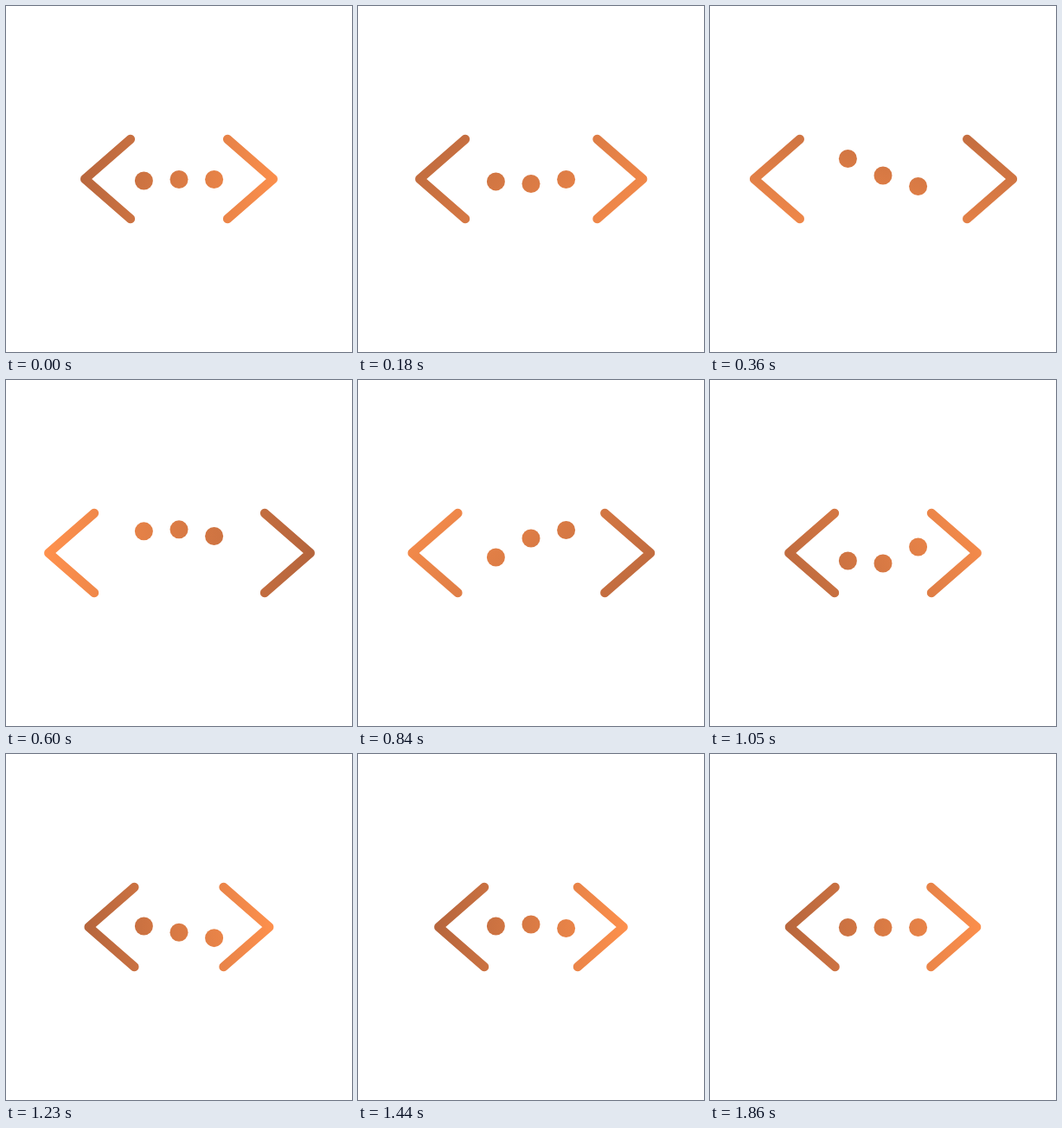
An HTML page with a canvas for the animation above (3.89 s loop, 400 by 400 pixels).

```html
<!DOCTYPE html>
<html lang="en">
<head>
<meta charset="utf-8">
<title>Code loader</title>
<style>
html, body { margin: 0; width: 100%; height: 100%; overflow: hidden; background: #fff; }
canvas { display: block; width: 400px; height: 400px; }
</style>
</head>
<body>
<canvas id="stage" width="400" height="400"></canvas>
<script>
const ctx = document.getElementById('stage').getContext('2d');
const LOOP = 3890, STEP = 30, ACTIVE = 1860;
const MID = 200, REST_Y = 200.5, DOT_DELAY = 133;
const DARK = '#b4643c', LIGHT = '#ff914d';

// Monotone cubic curve through [time, value] keys, held at both ends.
function curve(keys) {
  const n = keys.length;
  const slope = i => (keys[i + 1][1] - keys[i][1]) / (keys[i + 1][0] - keys[i][0]);
  const tangents = keys.map((_, i) => {
    if (i === 0 || i === n - 1) return 0;
    const a = slope(i - 1), b = slope(i);
    return a * b <= 0 ? 0 : 2 * a * b / (a + b);
  });
  return t => {
    if (t <= keys[0][0]) return keys[0][1];
    if (t >= keys[n - 1][0]) return keys[n - 1][1];
    const i = keys.findIndex(k => k[0] > t) - 1;
    const [t0, v0] = keys[i], [t1, v1] = keys[i + 1];
    const h = t1 - t0, u = (t - t0) / h, w = 1 - u;
    return v0 * (1 + 2 * u) * w * w + tangents[i] * h * u * w * w
         + v1 * u * u * (3 - 2 * u) - tangents[i + 1] * h * u * u * w;
  };
}

// Distance of the bracket tips from the centre.
const spread = curve([
  [-30, 55.4], [0, 56.1], [90, 63.5], [180, 76], [270, 88.5], [360, 96.2],
  [490, 98.9], [600, 98], [720, 94], [840, 84.6], [950, 70], [1050, 56],
  [1190, 51.5], [1440, 54], [1650, 55.2], [1860, 55.4]
]);

// Vertical bounce of a dot.
const bounce = curve([
  [-40, 0], [0, 1.5], [94, 8], [115, 8.4], [227, -4.5], [334, -20], [360, -24],
  [467, -27.7], [510, -28.2], [574, -27], [600, -25.7], [707, -17.5], [784, -7.5],
  [840, 4.5], [917, 11.5], [955, 12.2], [1050, 8.5], [1174, 1], [1307, -3.5],
  [1440, -1.5], [1590, 0]
]);

// Direction of the gradient from dark to light, in degrees.
const turn = curve([
  [-30, 8], [0, 9], [180, 45], [360, 101], [480, 145], [600, 181],
  [720, 196], [840, 222], [950, 278], [1050, 330], [1200, 355],
  [1440, 364], [1860, 368]
]);

function paint(t, s) {
  const a = turn(t) * Math.PI / 180;
  const dx = Math.cos(a), dy = Math.sin(a);
  const half = Math.abs(dx) * (s + 58) + Math.abs(dy) * 92;
  const g = ctx.createLinearGradient(
    MID - dx * half, MID - dy * half, MID + dx * half, MID + dy * half);
  g.addColorStop(0, DARK);
  g.addColorStop(1, LIGHT);
  return g;
}

function bracket(side, s) {
  const tip = MID + side * s, apex = tip + side * 52.7;
  ctx.beginPath();
  ctx.moveTo(tip, 154);
  ctx.lineTo(apex, 200);
  ctx.lineTo(tip, 246);
  ctx.stroke();
}

function draw(t) {
  const s = spread(t);
  ctx.fillStyle = '#fff';
  ctx.fillRect(0, 0, 400, 400);
  ctx.fillStyle = ctx.strokeStyle = paint(t, s);
  ctx.lineWidth = 10.4;
  ctx.lineCap = ctx.lineJoin = 'round';
  bracket(-1, s);
  bracket(1, s + (s - 55.4) * 0.025);
  for (let i = 0; i < 3; i++) {
    ctx.beginPath();
    ctx.arc(159.4 + i * 40.6, REST_Y + bounce(t - i * DOT_DELAY), 10.5, 0, Math.PI * 2);
    ctx.fill();
  }
}

const start = performance.now();
function tick() {
  const t = Math.min((performance.now() - start) % LOOP, ACTIVE);
  draw(Math.floor(t / STEP) * STEP);
  requestAnimationFrame(tick);
}
tick();
</script>
</body>
</html>
```
